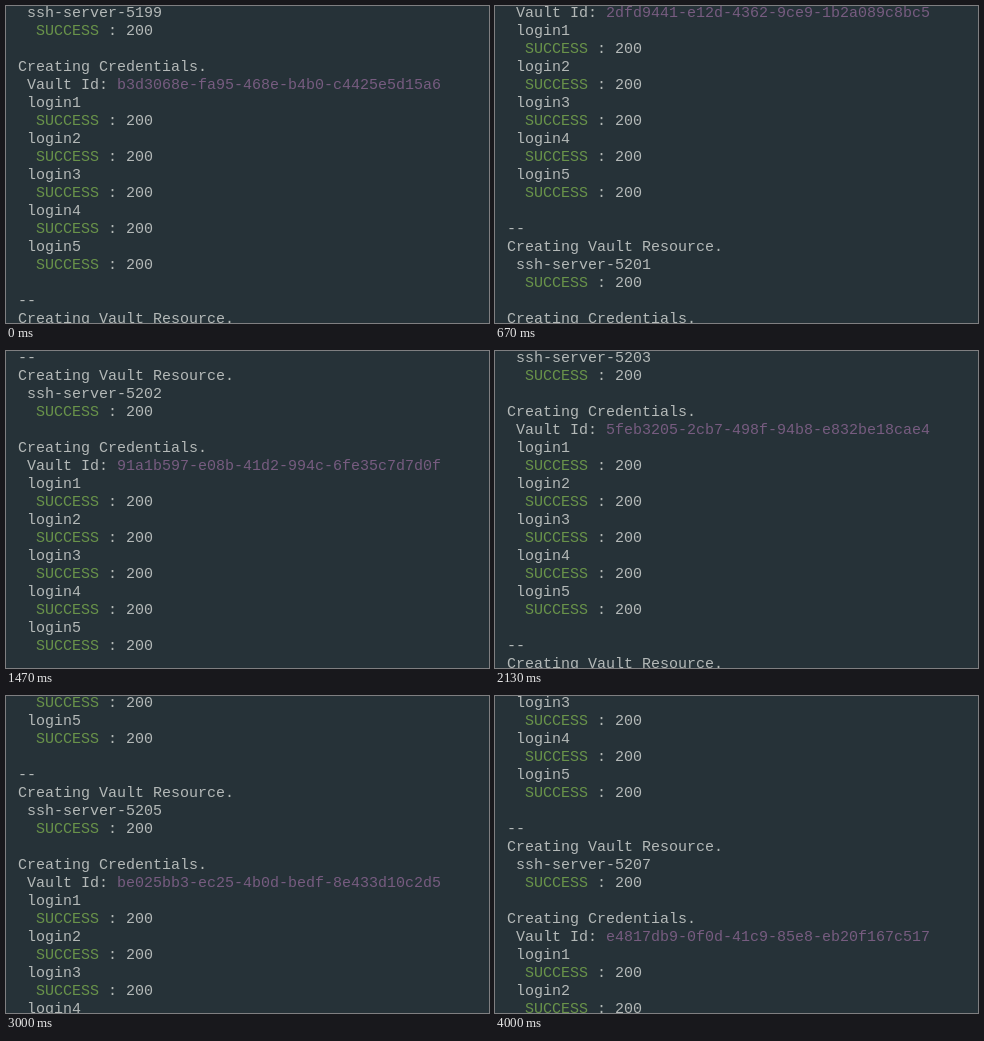
These frames come from a looping animation (483 by 317 pixels, 4070 ms). An HTML page:

```html
<!DOCTYPE html>
<html lang="en">
<head>
<meta charset="utf-8">
<title>Vault setup log</title>
<style>
  html, body { margin: 0; width: 100%; height: 100%; overflow: hidden; background: #263238; }
  svg { display: block; width: 483px; height: 317px; overflow: hidden; }
  text { font: 15px "Liberation Mono", monospace; fill: #b4b9b8; white-space: pre; }
  .ok { fill: #69934a; }
  .id { fill: #775c80; }
</style>
</head>
<body>
<svg viewBox="0 0 483 317"><g id="log"></g></svg>
<script>
const LOOP = 4070, LINE = 18, CELL = 9, LEFT = 12, BASELINE = 11;
const FIRST_SERVER = 5199, FIRST_LINE = 2;
const vaultIds = [
  "b3d3068e-fa95-468e-b4b0-c4425e5d15a6",
  "2dfd9441-e12d-4362-9ce9-1b2a089c8bc5",
  "7c40e1d8-53ab-4f17-a6d2-90be47f3c82a",
  "91a1b597-e08b-41d2-994c-6fe35c7d7d0f",
  "5feb3205-2cb7-498f-94b8-e832be18cae4",
  "a86f27c3-1d94-4e50-8b3a-f5709d2c61e8",
  "be025bb3-ec25-4b0d-bedf-8e433d10c2d5",
  "3722c004-5279-4ab6-9325-4634e8e6a952",
  "e4817db9-0f0d-41c9-85e8-eb20f167c517"
];

// Lines scrolled at each tick of 1/15 s; zeros are waits for a response.
const scrolls = [
  0, 4, 2, 0, 4, 2, 4, 0, 2, 2, 2, 0, 4, 4, 4, 0,
  2, 4, 2, 2, 2, 2, 4, 0,
  2, 4, 2, 2, 2, 2, 4, 0,
  2, 4, 2, 0, 2, 0, 2, 2, 2, 2, 0,
  6, 4, 4, 2, 2, 0,
  2, 4, 2, 4, 2, 2, 2, 2, 4, 0, 2, 3
];

const logGroup = document.getElementById("log");
let row = 0;

function put(column, content, className = "") {
  const text = document.createElementNS("http://www.w3.org/2000/svg", "text");
  text.setAttribute("x", LEFT + column * CELL);
  text.setAttribute("y", BASELINE + row * LINE);
  text.setAttribute("class", className);
  text.textContent = content;
  logGroup.append(text);
}

function line(column, content) {
  put(column, content);
  row++;
}

function success() {
  put(2, "SUCCESS", "ok");
  line(10, ": 200");
}

vaultIds.forEach((id, i) => {
  line(0, "--");
  line(0, "Creating Vault Resource.");
  line(1, `ssh-server-${FIRST_SERVER + i}`);
  success();
  row++;
  line(0, "Creating Credentials.");
  put(11, id, "id");
  line(1, "Vault Id:");
  for (let n = 1; n <= 5; n++) {
    line(1, `login${n}`);
    success();
  }
  row++;
});

let topLine = FIRST_LINE;
const keyframes = scrolls.map((lines, tick) => {
  topLine += lines;
  return {
    offset: Math.round(tick * 20 / 3) * 10 / LOOP,
    transform: `translateY(${-topLine * LINE}px)`,
    easing: "step-end"
  };
});
keyframes.push({ offset: 1, transform: keyframes.at(-1).transform });
logGroup.animate(keyframes, { duration: LOOP, iterations: Infinity });
</script>
</body>
</html>
```
